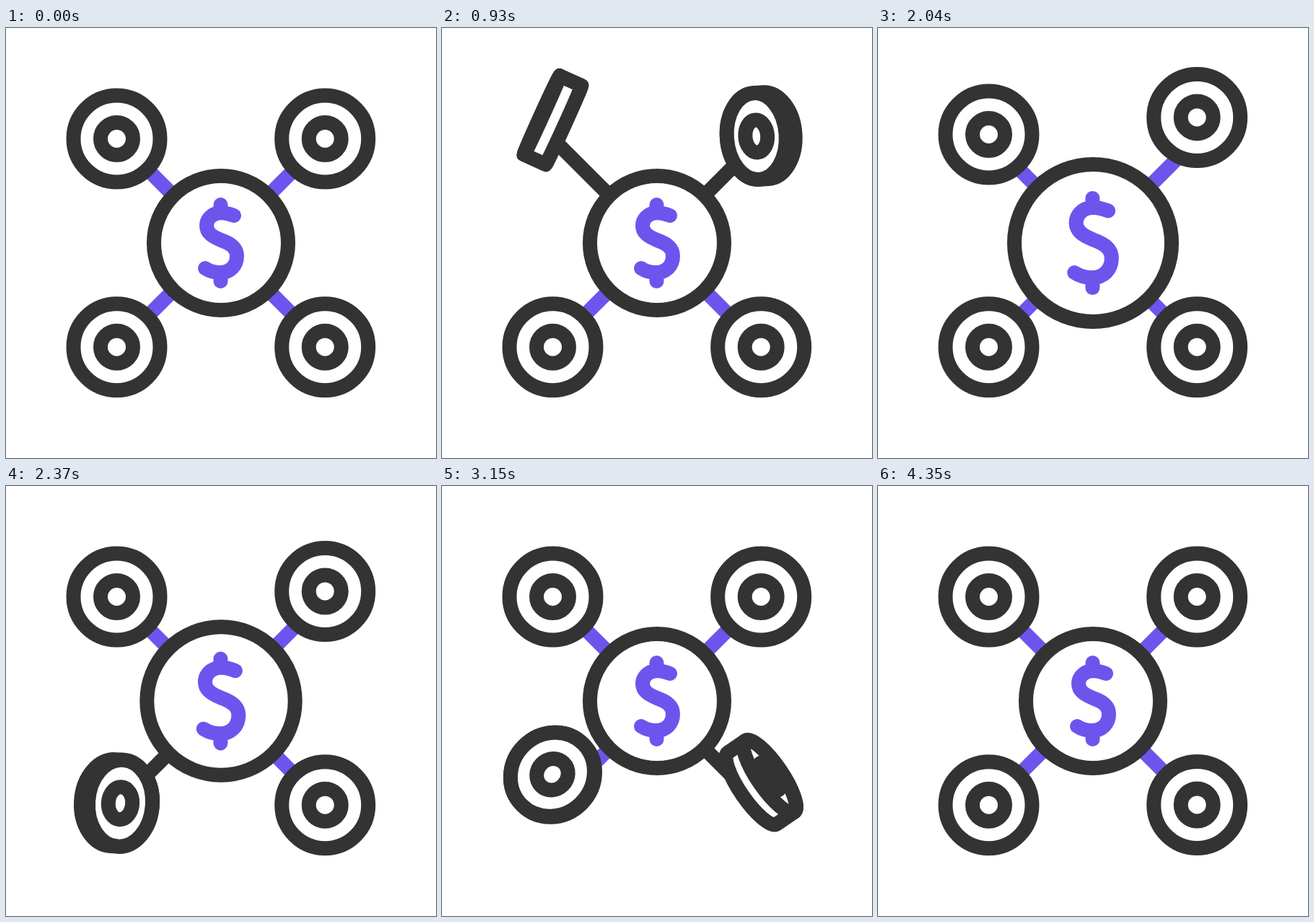
Animation, 596 px wide and 596 px high, one loop 4.5 s. Source, as an HTML page with a canvas:

```html
<!DOCTYPE html>
<html lang="en">
<head>
<meta charset="utf-8">
<title>Coin network</title>
<style>
html, body { margin: 0; width: 100%; height: 100%; overflow: hidden; background: #fff; }
canvas { display: block; width: 596px; height: 596px; }
</style>
</head>
<body>
<canvas id="stage" width="596" height="596"></canvas>
<script>
const ctx = document.getElementById('stage').getContext('2d');
const DARK = '#333333', VIOLET = '#6c55ed', WHITE = '#ffffff';
const LOOP = 4500, STEP = 30, LAST = 4350;
const MID = 298, LIFT = 42, THICK = 16.5;

// delay shifts the shared timetable; side mirrors the tumble
const coins = [
  { x: 153.5, y: 153.5, delay: 0, side: 1 },
  { x: 442.2, y: 153.5, delay: 360, side: -1 },
  { x: 153.5, y: 442.2, delay: 1830, side: 1 },
  { x: 442.2, y: 442.2, delay: 2130, side: -1 }
];

const rise = [[380, 0], [1340, 1], [2270, 0]];
const turn = [[280, 0], [570, 47], [870, 89.3], [930, 91.2], [1230, 141.5], [1430, 180]];
const tilt = [[280, 0], [570, 4], [870, 20.5], [930, 24.5], [1080, 41], [1230, 45]];
const pulse = [[1620, 0], [2130, 1], [2650, 0]];
const darkLine = [280, 1080];

const linear = u => u;
const sine = u => (1 - Math.cos(Math.PI * u)) / 2;

function at(keys, t, ease = linear) {
  if (t <= keys[0][0]) return keys[0][1];
  for (let i = 1; i < keys.length; i++) {
    const [t0, a] = keys[i - 1], [t1, b] = keys[i];
    if (t < t1) return a + (b - a) * ease((t - t0) / (t1 - t0));
  }
  return keys[keys.length - 1][1];
}

const rad = deg => deg * Math.PI / 180;

function paint(color = DARK) {
  ctx.fillStyle = WHITE;
  ctx.strokeStyle = color;
  ctx.fill();
  ctx.stroke();
}

function oval(x, rx, ry) {
  ctx.beginPath();
  ctx.ellipse(x, 0, rx, ry, 0, 0, 2 * Math.PI);
  paint();
}

function drawLine(coin, t) {
  const local = t - coin.delay;
  const dark = local >= darkLine[0] && local < darkLine[1];
  ctx.strokeStyle = dark ? DARK : VIOLET;
  ctx.lineCap = 'butt';
  ctx.beginPath();
  ctx.moveTo(MID, MID);
  ctx.lineTo(coin.x, coin.y);
  ctx.stroke();
}

function drawCoin({ x, y, delay, side }, t) {
  const local = t - delay;
  const angle = rad(at(turn, local));
  const squash = Math.max(0.001, Math.abs(Math.cos(angle)));
  const off = THICK * Math.sin(angle) ** 3;
  const face = off * side * (Math.cos(angle) < 0 ? -1 : 1);
  const q = Math.PI / 2;

  ctx.save();
  ctx.translate(x, y - LIFT * at(rise, local, sine));
  ctx.rotate(rad(side * at(tilt, local)));
  if (off > 0.01) {
    ctx.beginPath();
    ctx.ellipse(off, 0, 60 * squash, 60, 0, -q, q);
    ctx.ellipse(-off, 0, 60 * squash, 60, 0, q, 3 * q);
    ctx.closePath();
    paint();
  }
  oval(face, 60 * squash, 60);
  oval(face, 22.5 * squash, 22.5);
  ctx.restore();
}

const dollar = new Path2D(
  'M18-38C10-41 4-42-1-42C-13-41-20-33-20-24C-20-14-12-9 0-4' +
  'C14 1 22 7 22 18C22 32 12 41-1 41C-9 41-16 39-22 35' +
  'M-.5-53V-42M-.5 41V53');

function drawCenter(t) {
  const k = 1 + 0.186 * at(pulse, t, sine);
  ctx.save();
  ctx.translate(MID, MID);
  ctx.scale(k, k);
  ctx.lineWidth = 20 / k;
  oval(0, 93, 93);
  ctx.lineCap = 'round';
  ctx.strokeStyle = VIOLET;
  ctx.stroke(dollar);
  ctx.restore();
}

function draw(t) {
  ctx.fillStyle = WHITE;
  ctx.fillRect(0, 0, 596, 596);
  ctx.lineWidth = 20;
  ctx.lineJoin = 'round';
  coins.forEach(c => drawLine(c, t));
  coins.forEach(c => drawCoin(c, t));
  drawCenter(t);
}

function tick() {
  const t = performance.now() % LOOP;
  draw(Math.min(LAST, Math.floor(t / STEP) * STEP));
  requestAnimationFrame(tick);
}
draw(0);
requestAnimationFrame(tick);
</script>
</body>
</html>
```
